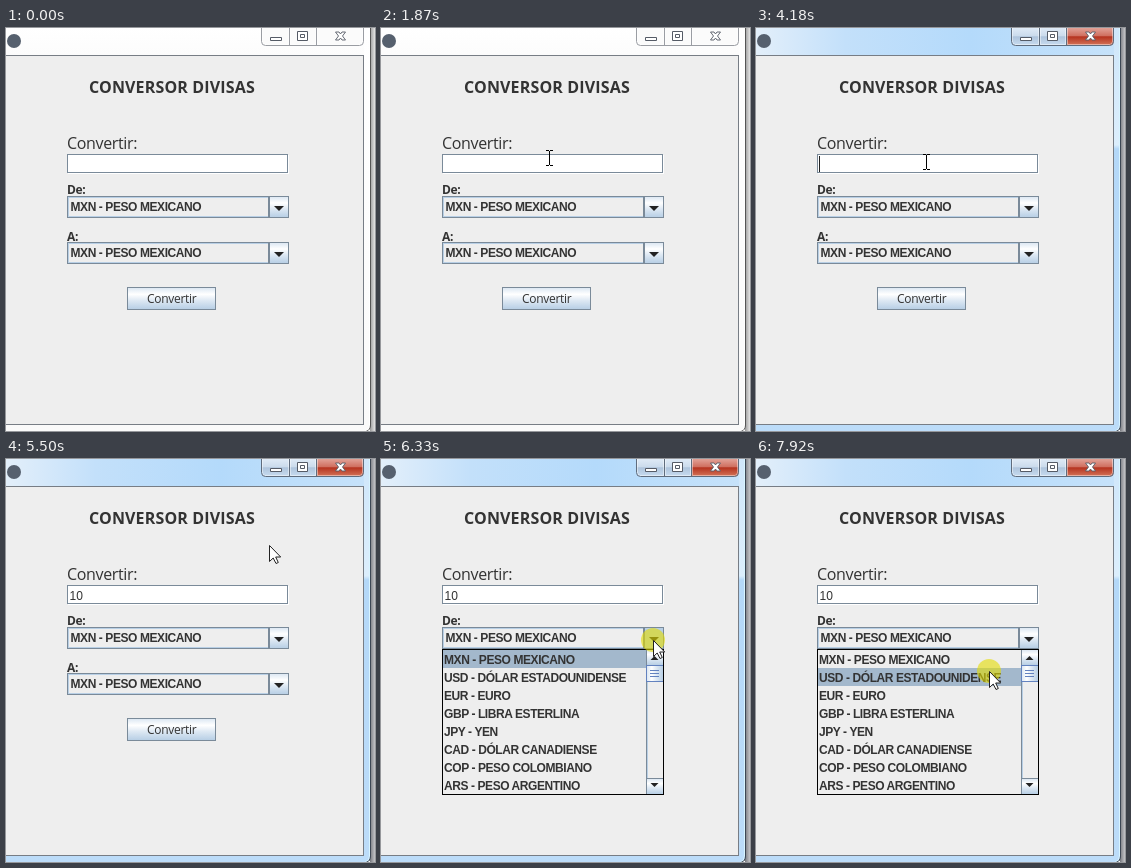
Write an HTML page that moves like this. It is 369 px wide and 403 px high and loops after 7990 ms.

```html
<!DOCTYPE html>
<html lang="es">
<head>
<meta charset="utf-8">
<title>Conversor</title>
<style>
html, body { margin: 0; width: 100%; height: 100%; overflow: hidden; background: #fff; }
svg { display: block; width: 100vw; height: 100vh; }
text { fill: #333; white-space: pre; }
.tah { font-family: "Open Sans", "Noto Sans", sans-serif; }
.dlg { font: bold 12px "Liberation Sans", Arial, sans-serif; letter-spacing: -.42px; }
.crisp { shape-rendering: crispEdges; }
</style>
</head>
<body>
<svg id="stage" viewBox="0 0 369 403"></svg>
<script>
const LOOP = 7990;
const LINE = '#7a8a99', SOFT = '#b8cfe5', PICK = '#a3b8cc', PANEL = '#eee';
const ITEMS = ['MXN - PESO MEXICANO', 'USD - DÓLAR ESTADOUNIDENSE', 'EUR - EURO',
  'GBP - LIBRA ESTERLINA', 'JPY - YEN', 'CAD - DÓLAR CANADIENSE',
  'COP - PESO COLOMBIANO', 'ARS - PESO ARGENTINO'];

// Pointer legs: start, end, from x,y, bend x,y, to x,y, eased
const LEGS = [
  [640, 1400, 284, 340, 235, 225, 174, 135, true],
  [1400, 1540, 174, 135, 169, 128, 168, 128],
  [1670, 1870, 168, 128, 168, 129, 168, 130],
  [2450, 2670, 168, 130, 168, 132, 169, 134],
  [3510, 3650, 169, 134, 170, 134, 170, 134],
  [5100, 5500, 170, 134, 215, 70, 263, 86],
  [5500, 5850, 263, 86, 300, 84, 288, 184],
  [5850, 6060, 288, 184, 281, 181, 272, 181],
  [6650, 6990, 272, 181, 250, 195, 237, 208],
  [7120, 7400, 237, 208, 235, 211, 233, 212]
];

const box = (x, y, w, h, fill, more = '') =>
  `<rect class="crisp" x="${x}" y="${y}" width="${w}" height="${h}" fill="${fill}" ${more}/>`;
const framed = (x, y, w, h, fill, line = LINE) => box(x, y, w, h, line) + box(x + 1, y + 1, w - 2, h - 2, fill);
const path = (d, fill, more = '') => `<path d="${d}" fill="${fill}" ${more}/>`;
const label = (x, y, s, size, gap, weight = 400) =>
  `<text class="tah" x="${x}" y="${y}" style="font-size:${size}px;font-weight:${weight};letter-spacing:${gap}px">${s}</text>`;
const item = (x, y, s) => `<text class="dlg" x="${x}" y="${y}">${s}</text>`;
// Triangle with its base at x,y; negative height points up
const wedge = (x, y, half, h) => path(`M${x - half} ${y}h${2 * half}l${-half} ${h}z`, '#222');
const grad = (id, stops, across) =>
  `<linearGradient id="${id}" x2="${across ? 1 : 0}" y2="${across ? 0 : 1}">` +
  stops.map(([o, c]) => `<stop offset="${o}" stop-color="${c}"/>`).join('') + '</linearGradient>';

const combo = (y, id) =>
  framed(61, y, 202, 22, SOFT) + box(63, y + 2, 199, 18, PANEL) +
  framed(263, y, 20, 22, 'url(#btn)') +
  box(264, y + 1, 18, 20, SOFT, `id="${id}" visibility="hidden"`) +
  wedge(273, y + 10, 5, 5) + item(64.5, y + 15, ITEMS[0]);

// Window edges and caption buttons in one colour scheme
function chrome(c) {
  const caption = 'M255.5 0V13.5q0 4 4 4H353.5q4 0 4 -4V0';
  return box(364, 0, 5, 403, `url(#${c.shade})`) +
    path('M0 0H364V398Q364 403 359 403H0Z', `url(#${c.side})`) +
    box(0, 0, 358, 27, `url(#${c.top})`) +
    path('M363.5 0V397Q363.5 401.5 359.5 403', 'none', `stroke="${c.glow}"`) +
    path('M364.5 0V397Q364.5 402 360 403.5', 'none', `stroke="${c.edge}"`) +
    path(caption, c.pane) +
    path('M311 0V17.5H353.5q4 0 4 -4V0Z', c.close) +
    path('M256.5 0V13.5q0 3 3 3H282.5V0M284.5 0V16.5H309.5V0M311.5 0V16.5H353.5q3 0 3 -3V0', 'none',
      'stroke="#fff" stroke-opacity=".45"') +
    path(caption + 'M283.5 0V17M310.5 0V17', 'none', `stroke="${c.rim}"`) +
    path('M264.5 9.5h11v3h-11zM291.5 3.5h10v9h-10zM294.5 6.5h4v3h-4z', '#fff', 'stroke="#555b66"') +
    path('M329.5 4h3.5l1.5 2 1.5 -2h3.5l-3 4 3 4h-3.5l-1.5 -2 -1.5 2h-3.5l3 -4z', '#fff', 'stroke="#555b66" stroke-width=".9"');
}

const popup =
  box(61, 190, 222, 146, PANEL) +
  box(62, 191, 203, 18, PICK, 'id="pick"') +
  ITEMS.map((s, i) => item(63, 205 + 18 * i, s)).join('') +
  box(265, 191, 1, 144, LINE) + box(266, 191, 1, 144, SOFT) +
  framed(265, 190, 18, 17, 'url(#btn)') + wedge(273.5, 201, 4, -4) +
  framed(265, 206, 18, 17, 'url(#thumb)', '#6382bf') +
  [211, 214, 217].map(y => box(269, y, 9, 1, '#6382bf')).join('') +
  framed(265, 319, 18, 17, 'url(#btn)') + wedge(273.5, 324, 4, 4) +
  box(61.5, 190.5, 221, 145, 'none', 'stroke="#000"');

document.getElementById('stage').innerHTML = `<defs>
  ${grad('btn', [[0, '#dde8f3'], [.3, '#fff'], [.6, '#dde8f3'], [1, SOFT]])}
  ${grad('thumb', [[0, '#dde8f3'], [.3, '#fff'], [.6, '#dde8f3'], [1, SOFT]], true)}
  ${grad('topOff', [[0, '#fff'], [1, '#fcfcfc']])}
  ${grad('sideOff', [[0, '#fff'], [1, '#fafafa']])}
  ${grad('shadeOff', [[0, '#999'], [1, '#e4e4e4']], true)}
  ${grad('topOn', [[0, '#e3effa'], [.25, '#c3e0fa'], [.6, '#b4dafb'], [1, '#c6e2fa']], true)}
  ${grad('sideOn', [[0, '#cfe6fa'], [.29, '#dceefc'], [.3, '#b4d8f8'], [1, '#bcdcf9']])}
  ${grad('shadeOn', [[0, '#77797f'], [1, '#c4c4c8']], true)}
  ${grad('min', [[0, '#dfeaf6'], [.45, '#cbdbec'], [.5, '#aec4dc'], [1, '#c8dcf0']])}
  ${grad('red', [[0, '#e2a297'], [.45, '#cf6f5f'], [.5, '#b5331f'], [1, '#d4755a']])}
  </defs>` +
  chrome({ shade: 'shadeOff', side: 'sideOff', top: 'topOff', edge: '#555', glow: '#fff', pane: '#fbfbfb', close: '#fbfbfb', rim: '#9a9da3' }) +
  `<g id="active">${chrome({ shade: 'shadeOn', side: 'sideOn', top: 'topOn', edge: '#3c4654', glow: '#d8f4ff', pane: 'url(#min)', close: 'url(#red)', rim: '#5f6c7d' })}</g>` +
  '<circle cx="8" cy="13" r="7" fill="#56606e"/>' +
  box(0, 27, 358, 370, '#777d85') + box(0, 28, 357, 368, PANEL) +
  label(83, 65, 'CONVERSOR DIVISAS', 16, .15, 700) +
  label(61, 121, 'Convertir:', 16, -.35) +
  box(62, 127, 221, 19, '#fff') + framed(61, 126, 221, 19, '#fff') +
  '<text id="amount" x="63.5" y="141" style="font:12px \'Liberation Sans\',Arial,sans-serif"></text>' +
  box(63, 128, 1, 16, '#222', 'id="caret"') +
  label(61, 166, 'De:', 12, -.3, 700) + combo(168, 'held') +
  label(61, 213, 'A:', 12, -.3, 700) + combo(214, 'idle') +
  framed(121, 259, 89, 23, 'url(#btn)') + label(141, 275, 'Convertir', 12, -.3) +
  `<g id="popup">${popup}</g>` +
  '<circle id="click" r="12" fill="#e4dc00" fill-opacity=".6"/>' +
  `<g id="arrow">${path('M.5 .5V16.5L4.2 13 7 18.5 9.3 17.5 6.7 12H11.7Z', '#fff', 'stroke="#222"')}</g>` +
  `<g id="beam">${path('M-3 -7.5h3m1 0h3M.5 -7v14M-3 7.5h3m1 0h3', 'none', 'class="crisp" stroke="#000"')}</g>`;

const $ = id => document.getElementById(id);
const show = (id, on) => $(id).setAttribute('visibility', on ? 'visible' : 'hidden');

// The pointer advances in steps of about 69 ms
function pointer(t) {
  const [t0, t1, x0, y0, bx, by, x1, y1, eased] = LEGS.filter(l => l[0] <= t).pop() || LEGS[0];
  const n = Math.round((t1 - t0) / 68.5);
  let p = Math.max(0, Math.min(n, Math.floor((t - t0) / (t1 - t0) * n + .03))) / n;
  if (eased) p = p * p * (3 - 2 * p);
  const q = 1 - p, at = (a, b, c) => Math.round(q * q * a + 2 * p * q * b + p * p * c);
  return [at(x0, bx, x1), at(y0, by, y1)];
}

function caretOn(t) {
  if (t < 2190 || t >= 6260) return false;
  if (t < 4310) return t < 2670 || (t >= 3180 && t < 3650) || t >= 4180;
  return t < 5230 || t >= 5720;
}

function draw(t) {
  const [x, y] = pointer(t);
  const inField = x > 61 && x < 283 && y >= 126 && y < 146;
  const visible = t >= 640 && !(t >= 4910 && t < 5170);
  const pressed = t >= 6260 && t < 6390;
  for (const id of ['arrow', 'beam', 'click']) $(id).setAttribute('transform', `translate(${x} ${y})`);
  show('arrow', visible && !inField);
  show('beam', visible && inField);
  show('click', pressed || t >= 7920);
  show('held', pressed);
  $('active').setAttribute('opacity', t < 2190 ? 0 : t < 2270 ? .5 : 1);

  const typed = '10'.slice(0, t < 4310 ? 0 : t < 4710 ? 1 : 2);
  $('amount').textContent = typed;
  $('caret').setAttribute('x', 63 + 7 * typed.length);
  show('caret', caretOn(t));
  show('popup', t >= 6330);
  $('pick').setAttribute('y', t < 7190 ? 191 : 209);
}

const start = performance.now();
function tick(now) {
  draw(Math.max(0, now - start) % LOOP);
  requestAnimationFrame(tick);
}
draw(0);
requestAnimationFrame(tick);
</script>
</body>
</html>
```
